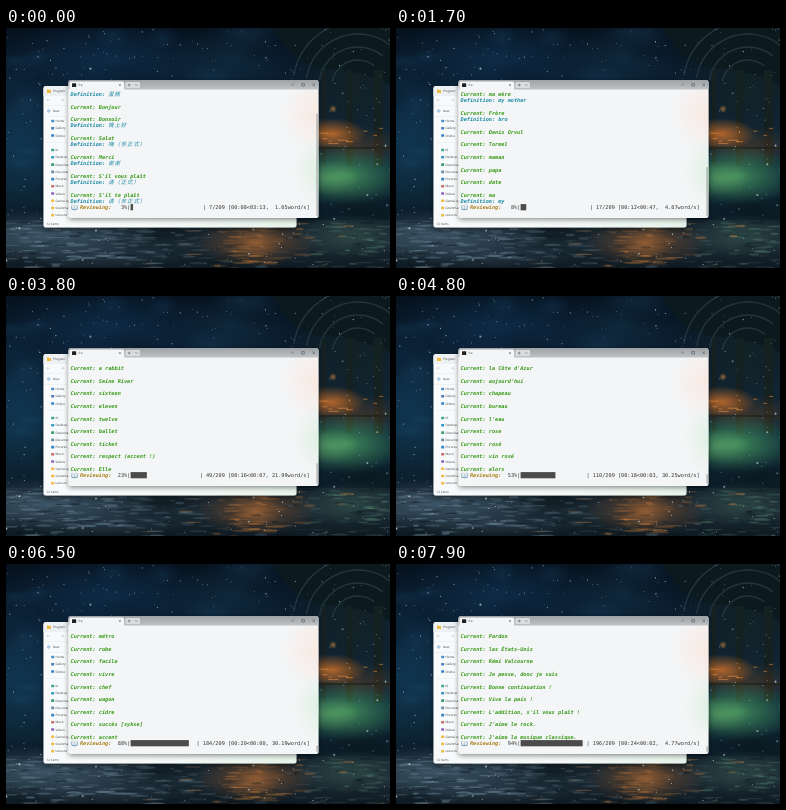
These frames come from a looping animation (384x240 px, 8000 ms). An HTML page with a canvas:

```html
<!DOCTYPE html>
<html lang="en">
<head>
<meta charset="utf-8">
<title>Word review</title>
<style>
html, body { margin: 0; width: 100%; height: 100%; overflow: hidden; background: #0a1620; }
canvas, svg { position: absolute; left: 0; top: 0; width: 384px; height: 240px; }
text { white-space: pre; text-rendering: geometricPrecision; }
.ui { font-family: "Open Sans", "Noto Sans", sans-serif; font-size: 3.1px; fill: #444; }
.term { font-family: "DejaVu Sans Mono", "Noto Sans CJK SC", "Noto Sans CJK", monospace; font-size: 5.23px; fill: #333; }
.cur, .def { font-weight: bold; font-style: italic; }
.cur { fill: #379a17; }
.def { fill: #198aa5; }
.wide { font-size: 5.4px; letter-spacing: .9px; font-weight: normal; }
.label { fill: #a9811a; font-weight: bold; font-style: italic; }
</style>
</head>
<body>
<canvas id="scene" width="384" height="240"></canvas>
<svg viewBox="0 0 384 240">
  <defs>
    <filter id="shadow" x="-10%" y="-10%" width="120%" height="125%">
      <feDropShadow dx="0" dy="1.5" stdDeviation="2.5" flood-color="#000" flood-opacity=".45"/>
    </filter>
    <linearGradient id="title" x2="0" y2="1">
      <stop offset="0" stop-color="#9da2a6"/><stop offset="1" stop-color="#bec2c4"/>
    </linearGradient>
    <linearGradient id="sheet">
      <stop offset="0" stop-color="#f8fafb"/><stop offset=".5" stop-color="#f3f8f6"/><stop offset="1" stop-color="#e6f3ea"/>
    </linearGradient>
    <radialGradient id="pink"><stop offset="0" stop-color="#ffd9c8" stop-opacity=".45"/><stop offset="1" stop-color="#ffd9c8" stop-opacity="0"/></radialGradient>
    <radialGradient id="mint"><stop offset="0" stop-color="#c4ecd0" stop-opacity=".5"/><stop offset="1" stop-color="#c4ecd0" stop-opacity="0"/></radialGradient>
    <clipPath id="pane"><rect x="62.5" y="62" width="250" height="128" rx="2"/></clipPath>
  </defs>

  <g id="files" filter="url(#shadow)">
    <rect x="37.5" y="58" width="253" height="141.5" rx="2.5" fill="url(#sheet)"/>
    <path d="M37.5 68V60.5a2.5 2.5 0 0 1 2.5-2.5H63V68Z" fill="#eef1f4"/>
    <path d="M41 61.4h1.7l.6.7h1.7v3h-4Z" fill="#eeb93c"/>
    <text class="ui" x="47" y="64.4">Program</text>
    <path d="M44 72.2h-3m1-1-1 1 1 1M55 72.2h3m-1-1 1 1-1 1" fill="none" stroke="#a4a9ae" stroke-width=".4"/>
    <path d="M38 77.5H63M38 88.5H63M40 114.5H63" stroke="#e4e8eb" stroke-width=".5"/>
    <circle cx="42.7" cy="83" r="1.4" fill="none" stroke="#3c86c4" stroke-width=".4"/>
    <path d="M42 83h1.4m-.7-.7v1.4" stroke="#3c86c4" stroke-width=".4"/>
    <text class="ui" x="47" y="84.1">New</text>
    <text class="ui" x="40.5" y="197">12 items</text>
  </g>

  <g filter="url(#shadow)">
    <rect x="62.5" y="52" width="250" height="138" rx="2.5" fill="#f4f5f6"/>
    <path d="M62.5 61.5V54.5a2.5 2.5 0 0 1 2.5-2.5H310a2.5 2.5 0 0 1 2.5 2.5V61.5Z" fill="url(#title)"/>
  </g>
  <g clip-path="url(#pane)">
    <ellipse cx="312" cy="86" rx="34" ry="36" fill="url(#pink)"/>
    <ellipse cx="316" cy="142" rx="28" ry="36" fill="url(#mint)"/>
  </g>
  <path d="M63.5 62V55.2a1.7 1.7 0 0 1 1.7-1.7H116.5a1.7 1.7 0 0 1 1.7 1.7V62Z" fill="#f4f5f6"/>
  <rect x="66" y="55.3" width="4.2" height="3.8" rx=".5" fill="#222"/>
  <text class="ui" x="72.5" y="58.4">fra</text>
  <rect x="119.5" y="54" width="14.5" height="6" rx="1" fill="#d9dcde"/>
  <path d="M113 56.2l1.8 1.8m0-1.8-1.8 1.8M121.8 57h2.8m-1.4-1.4v2.8M129.2 56.4l1.1 1.1 1.1-1.1M285.2 57.3l1.3-1.2 1.3 1.2M295.8 55.5h2.6v2.6h-2.6ZM306.4 55.5l2.6 2.6m0-2.6-2.6 2.6" fill="none" stroke="#444" stroke-width=".5"/>
  <g id="log" class="term"></g>
  <path d="M65.5 177.4l3 .8 3-.8v4l-3 .8-3-.8Z" fill="#4f8fb0"/>
  <path d="M66 176.8l2.4.8v3.8l-2.4-.7ZM71 176.8l-2.4.8v3.8l2.4-.7Z" fill="#e9eef0" stroke="#9db4c0" stroke-width=".2"/>
  <text class="term label" id="label">Reviewing:</text>
  <text class="term" id="percent"></text>
  <rect id="bar" x="124.6" y="176.1" height="6.2" fill="#4b4b4b"/>
  <text class="term" id="tail"></text>
  <rect id="thumb" x="310.6" width=".9" rx=".4" fill="#8b8e8f"/>
</svg>

<script>
const LOOP = 8000, STEP = 100, TOTAL = 209;
const LEFT = 64.5, CELL = 3.15, TOP = 67.9, PITCH = 6.3, ROWS = 18, COLS = 76;
const $ = id => document.getElementById(id);

// time, card on screen (.5 and up: its definition is out), elapsed s, words per s
const KEYS = [
  [0, 8.6, 8.3, 1.046], [1700, 18.6, 12.1, 4.07], [2700, 23.3, 14.1, 3.38],
  [3350, 23.6, 15.3, 3.1], [3800, 50.2, 16.2, 21.99], [4800, 111.2, 18.2, 30.25],
  [6050, 185.2, 20.6, 30.19], [6500, 185.3, 20.9, 30.19],
  [7900, 197.3, 24.1, 4.77], [8000, 197.4, 24.3, 4.77]
];

const POOL = ("le chat|rouge|maison|jardin|fromage|bonne nuit|école|livre|pomme|soleil|lundi|la gare|" +
  "petit|merci bien|fenêtre|voiture|le pain|jeudi|grand|plage|hiver|musée|oiseau|danser|le lait|" +
  "chemin|vert|cuisine|demain|chanson|la porte|froid|neige|marché|montagne").split("|");
const words = Array.from({ length: TOTAL + 1 }, (_, i) => POOL[i * 11 % POOL.length]);
const put = (from, list) => list.split("|").forEach((w, i) => words[from + i] = w);
put(2, "gâteau|Bonjour|Bonsoir|Salut|Merci|S'il vous plaît|S'il te plaît|Au revoir|ma sœur|ma mère|Frère|" +
  "Denis Orvul|Tormel|maman|papa|date|ma|ami|mardi|la salade|ma femme|bête");
put(42, "a rabbit|Seine River|sixteen|eleven|twelve|ballet|ticket|respect (accent !)|Elle");
put(103, "la Côte d'Azur|aujourd'hui|chapeau|bureau|l'eau|rose|rosé|vin rosé|alors");
put(177, "métro|robe|facile|vivre|chef|wagon|cidre|succès [sykse]|accent");
put(189, "Pardon|les États-Unis|Rémi Valcourne|Je pense, donc je suis|Bonne continuation !|Vive la pais !|" +
  "L'addition, s'il vous plaît !|J'aime le rock.|J'aime la musique classique.");
const meanings = {
  2: "蛋糕", 4: "晚上好", 5: "嗨（非正式）", 6: "谢谢", 7: "请（正式）", 8: "请（非正式）",
  9: "再见", 10: "my sister", 11: "my mother", 12: "bro", 18: "my", 19: "friend"
};

function svg(parent, tag, attrs, text = "") {
  const el = document.createElementNS("http://www.w3.org/2000/svg", tag);
  for (const k in attrs) el.setAttribute(k, attrs[k]);
  el.textContent = text;
  parent.appendChild(el);
  return el;
}

const place = (el, col, row) => {
  el.setAttribute("x", LEFT + col * CELL);
  el.setAttribute("y", TOP + row * PITCH);
};

// Side list of the file window
[["Home", 93, "#4a90c8"], ["Gallery", 100.3, "#4b78b8"], ["Online", 107.5, "#2f7fc8"],
 ["t0", 122, "#3fa58c"], ["Desktop", 129.3, "#2f9bc0"], ["Downloads", 136.6, "#3a9a78"],
 ["Documents", 143.9, "#6f8aa5"], ["Pictures", 151.1, "#3187c9"], ["Music", 158.3, "#c96a62"],
 ["Videos", 165.5, "#8a5fb5"], ["GameLog", 172.7, "#eeb93c"], ["Grammar", 180, "#eeb93c"],
 ["Lessons", 187.2, "#eeb93c"]].forEach(([name, y, fill]) => {
  svg($("files"), "rect", { x: 45.2, y: y - 1.3, width: 2.9, height: 2.6, rx: .5, fill });
  svg($("files"), "text", { class: "ui", x: 49.5, y: y + 1.1 }, name);
});
place($("label"), 3, ROWS);
place($("percent"), 14, ROWS);

function sample(t) {
  const i = Math.max(1, KEYS.findIndex(k => k[0] >= t));
  const a = KEYS[i - 1], b = KEYS[i], u = (t - a[0]) / (b[0] - a[0]);
  return a.map((v, j) => v * (1 - u) + b[j] * u);
}

const clock = s => [s / 60, s % 60].map(v => String(Math.floor(v)).padStart(2, "0")).join(":");

function drawTerminal(t) {
  const [, pos, elapsed, rate] = sample(t);
  const card = Math.floor(pos), done = card - 1;
  const lines = [];
  for (let i = 1; i <= card; i++) {
    lines.push(null, ["cur", "Current: ", words[i]]);
    if (meanings[i] && (i < card || pos % 1 >= .5)) lines.push(["def", "Definition: ", meanings[i]]);
  }

  const log = $("log");
  log.textContent = "";
  lines.slice(-ROWS).forEach((line, row) => {
    if (!line) return;
    const [kind, head, body] = line;
    const el = svg(log, "text", { class: kind });
    place(el, 0, row);
    svg(el, "tspan", {}, head);
    svg(el, "tspan", /[\u3000-\uffef]/.test(body) ? { class: "wide" } : {}, body);
  });

  const tail = `| ${done}/${TOTAL} [${clock(elapsed)}<${clock((TOTAL - done) / rate)}, ${rate.toFixed(2).padStart(5)}word/s]`;
  const start = COLS - tail.length;
  $("percent").textContent = String(Math.round(done / TOTAL * 100)).padStart(3) + "%|";
  $("bar").setAttribute("width", (start - 19) * CELL * done / TOTAL);
  $("tail").textContent = tail;
  place($("tail"), start, ROWS);

  const size = 124 * Math.min(1, (ROWS + 1) / (lines.length + 1));
  $("thumb").setAttribute("y", 188 - size);
  $("thumb").setAttribute("height", size);
}

// Night scene
let seed = 41;
const rnd = () => (seed = (seed * 16807) % 2147483647) / 2147483647;
const ctx = $("scene").getContext("2d");
const backdrop = document.createElement("canvas");
backdrop.width = 384;
backdrop.height = 240;

function paintBackdrop(c) {
  const fade = (y0, y1, ...stops) => {
    const g = c.createLinearGradient(0, y0, 0, y1);
    stops.forEach((s, i) => g.addColorStop(i / (stops.length - 1), s));
    c.fillStyle = g;
    c.fillRect(0, y0, 384, y1 - y0);
  };
  const glow = (x, y, rx, ry, rgb, a) => {
    c.save();
    c.translate(x, y);
    c.scale(rx, ry);
    const g = c.createRadialGradient(0, 0, 0, 0, 0, 1);
    g.addColorStop(0, `rgba(${rgb},${a})`);
    g.addColorStop(1, `rgba(${rgb},0)`);
    c.fillStyle = g;
    c.fillRect(-1, -1, 2, 2);
    c.restore();
  };
  const block = (x, y, w, h, fill) => { c.fillStyle = fill; c.fillRect(x, y, w, h); };

  fade(0, 193, "#06111d", "#0b2034", "#0e2a3e", "#0b1c28");
  fade(192, 240, "#16252f", "#1b2a34", "#0f1a22");
  glow(100, 30, 110, 42, "20,66,106", .45);
  glow(14, 110, 60, 80, "18,66,98", .5);
  glow(225, 30, 60, 36, "24,64,88", .4);
  for (let i = 0; i < 30; i++) {
    glow(rnd() * 270, rnd() * 180, 12 + rnd() * 24, 5 + rnd() * 12, i % 2 ? "34,86,122" : "4,10,18", .2);
  }

  // Pavilion on the right
  glow(350, 60, 80, 90, "20,34,38", .9);
  c.fillStyle = "#0c1a20";
  c.beginPath();
  c.moveTo(266, 0);
  c.quadraticCurveTo(290, 40, 318, 40);
  c.quadraticCurveTo(352, 42, 384, 56);
  c.lineTo(384, 0);
  c.fill();
  c.lineWidth = 1.4;
  for (let i = 0; i < 4; i++) {
    c.strokeStyle = "rgba(58,80,84,.5)";
    c.beginPath();
    c.arc(352, 58, 26 + i * 13, 3.3, 5.4);
    c.stroke();
  }
  [[316, 4], [340, 7], [368, 9]].forEach(([x, w]) => block(x, 42, w, 96, "#152021"));
  glow(352, 118, 60, 20, "98,64,38", .5);
  glow(326, 106, 34, 16, "226,120,40", .75);
  for (let i = 0; i < 9; i++) block(312 + rnd() * 62, 98 + rnd() * 18, 3 + rnd() * 9, 1.2, "rgba(236,146,66,.5)");
  block(312, 119, 72, 2, "#24261e");
  glow(340, 148, 62, 30, "74,160,98", .8);
  glow(324, 150, 30, 18, "120,196,116", .4);
  glow(360, 182, 50, 16, "10,24,28", .7);
  glow(327, 81, 4, 4, "230,150,70", .6);

  // Reflections
  glow(40, 208, 110, 26, "82,112,134", .6);
  glow(90, 228, 90, 14, "52,74,92", .5);
  glow(165, 206, 45, 12, "10,18,24", .5);
  glow(250, 214, 62, 24, "150,84,38", .6);
  glow(250, 216, 26, 18, "226,140,66", .35);
  glow(345, 208, 56, 22, "60,94,84", .55);
}
paintBackdrop(backdrop.getContext("2d"));

const streaks = Array.from({ length: 360 }, () => {
  const x = rnd() * 384, y = 193 + rnd() * 47, pick = rnd();
  const warm = Math.exp(-(((x - 250) / 48) ** 2));
  const rgb = pick < warm * .7 ? "244,150,66" : pick > .72 ? "8,16,22" : x > 310 ? "92,138,118" : "118,146,164";
  const far = x > 120 && x < 310 ? .7 : 1;
  return { x, y, w: 5 + rnd() * 18, h: .5 + rnd() * .8, rgb, a: (.15 + rnd() * .35) * far, k: 1 + Math.floor(rnd() * 5), p: rnd() * 6.28 };
});
const stars = Array.from({ length: 380 }, () => {
  const big = rnd();
  return { x: rnd() * 384, y: rnd() * 240, r: big > .9 ? 1.05 : .35 + big * .3, a: .35 + rnd() * .6, k: 1 + Math.floor(rnd() * 4), p: rnd() * 6.28 };
});

function drawScene(t) {
  const turn = t / LOOP * Math.PI * 2;
  ctx.drawImage(backdrop, 0, 0);
  for (const s of streaks) {
    const wave = Math.sin(turn * s.k + s.p);
    ctx.fillStyle = `rgba(${s.rgb},${s.a * (.75 + .25 * wave)})`;
    ctx.beginPath();
    ctx.ellipse(s.x + wave, s.y, s.w / 2, s.h, 0, 0, 7);
    ctx.fill();
  }
  for (const s of stars) {
    ctx.fillStyle = `rgba(220,234,240,${s.a * (.9 + .1 * Math.sin(turn * s.k + s.p))})`;
    ctx.beginPath();
    ctx.arc(s.x, s.y, s.r, 0, 7);
    ctx.fill();
  }
}

const begin = performance.now();
let shown = -1;
function tick() {
  const t = Math.floor((performance.now() - begin) % LOOP / STEP) * STEP;
  if (t !== shown) {
    shown = t;
    drawScene(t);
    drawTerminal(t);
  }
  requestAnimationFrame(tick);
}
tick();
</script>
</body>
</html>
```
